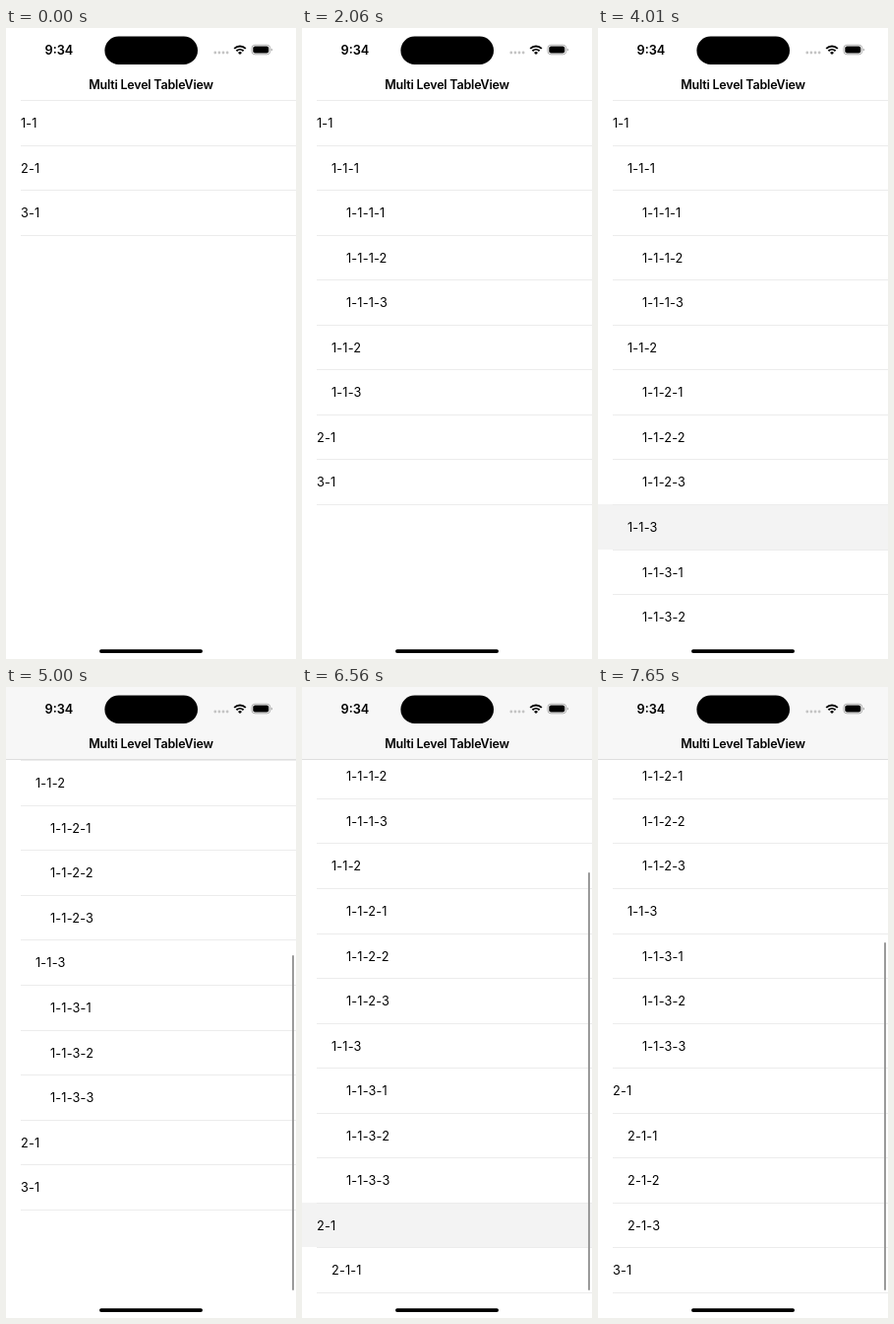
These frames come from a looping animation (295x640 px, 8000 ms). An HTML page:

```html
<!DOCTYPE html>
<html lang="en">
<head>
<meta charset="utf-8">
<title>Multi Level TableView</title>
<style>
  html, body { margin: 0; width: 100%; height: 100%; overflow: hidden; background: #fff; }
  body { position: relative; font: 12.75px Inter, "Liberation Sans", sans-serif; color: #000; }
  div, svg { position: absolute; box-sizing: border-box; }
  #table { left: 0; top: 0; width: 295px; height: 615px; overflow: hidden; }
  .row { left: 0; top: 0; width: 295px; height: 46px; line-height: 48px; letter-spacing: .15px; white-space: nowrap; }
  .row::before, .row::after { content: ""; position: absolute; left: 15px; right: 0; top: 0; height: 1px; background: #ececec; }
  .row::after { top: 46px; }
  #nav { left: 0; top: 0; width: 295px; height: 73px; }
  #nav.scrolled { height: 74px; background: #f7f7f7; border-bottom: 1px solid #dedede; }
  #title { left: 0; top: 48px; width: 295px; line-height: 20px; text-align: center; font-size: 12.5px; font-weight: 600; letter-spacing: -.2px; }
  #clock { left: 39.5px; top: 13px; line-height: 20px; font-weight: 600; }
  #thumb { left: 290.6px; width: 2.3px; border-radius: 2px; background: #9a9a9a; }
</style>
</head>
<body>
<div id="table"></div>
<div id="nav"><div id="title">Multi Level TableView</div><div id="clock">9:34</div></div>
<div id="thumb"></div>
<svg width="295" height="640" style="left:0;top:0">
  <rect x="100.4" y="8.5" width="94.6" height="28.4" rx="14.2"/>
  <path d="M212.8 25h13" stroke="#c4c4c4" stroke-width="2.8" stroke-linecap="round" stroke-dasharray="0 4.1"/>
  <g fill="none" stroke="#000" stroke-width="1.9">
    <path d="M232.2 20.9a8.3 8.3 0 0 1 11.6 0"/>
    <path d="M234.4 23.3a5.2 5.2 0 0 1 7.2 0"/>
  </g>
  <path d="M238 27l-2-2.1a2.9 2.9 0 0 1 4 0z"/>
  <rect x="249.9" y="17.2" width="18.8" height="9.6" rx="3.2" fill="none" stroke="#a6a6a6" stroke-width=".9"/>
  <rect x="251.3" y="18.6" width="16" height="6.8" rx="2"/>
  <path d="M269.7 20.4q1.3 .5 1.3 1.6t-1.3 1.6z" fill="#a6a6a6"/>
  <rect x="95" y="630.2" width="105" height="3.8" rx="1.9"/>
</svg>
<script>
const LOOP = 8000, STEP = 110, TOP = 73.5, ROW = 45.56, VIEW = 541;
const TRACK_TOP = 76.3, TRACK = 535.7;

// Time at which each parent row is tapped open
const taps = { '1-1': 500, '1-1-1': 1610, '1-1-2': 2820, '1-1-3': 3670, '2-1': 6220 };

// Each swipe pulls the list past its end, then lets it spring back
const swipes = [
  { at: 4780, drag: 330, release: 5260, settle: 520, rows: 15, pull: 90.8 },
  { at: 7090, drag: 300, release: 7540, settle: 110, rows: 18, pull: 3 },
];
const starts = [0, ...Object.values(taps), ...swipes.flatMap(s => [s.at, s.release])];

const $ = id => document.getElementById(id);
const clamp = x => Math.min(1, Math.max(0, x));
const ease = x => x * x * (3 - 2 * x);
const easeOut = x => 1 - (1 - x) ** 3;
const progress = (t, start, span) => easeOut(clamp((t - start + 30) / (span + 30)));
const endOf = swipe => swipe ? swipe.rows * ROW - VIEW : 0;

const rows = [];
function addRow(label, index = 0) {
  const el = document.createElement('div');
  el.className = 'row';
  el.textContent = label;
  el.style.paddingLeft = 15 * (label.length - 1) / 2 + 'px';
  $('table').append(el);
  rows.push({ el, label, index, parent: label.slice(0, -2) });
  if (taps[label]) for (let i = 0; i < 3; i++) addRow(`${label}-${i + 1}`, i);
}
['1-1', '2-1', '3-1'].forEach(label => addRow(label));

function openness(label, t) {
  const tap = taps[label];
  if (tap === undefined) return 1;
  return t < tap ? 0 : ease(clamp((t - tap + 20) / 300));
}

function highlight(label, t) {
  const age = t - taps[label];
  return age >= 0 ? 1 - clamp((age - 100) / 310) : 0;
}

function scrollAt(t, swipe, from) {
  if (!swipe) return 0;
  const end = endOf(swipe), peak = end + swipe.pull;
  return t < swipe.release
    ? from + (peak - from) * progress(t, swipe.at, swipe.drag)
    : peak + (end - peak) * progress(t, swipe.release, swipe.settle);
}

function drawThumb(t, swipe, scroll) {
  $('thumb').hidden = !swipe;
  if (!swipe) return;
  const content = swipe.rows * ROW;
  const over = Math.max(0, scroll - endOf(swipe));
  Object.assign($('thumb').style, {
    top: TRACK_TOP + (scroll - over) / content * TRACK + over + 'px',
    height: VIEW / content * TRACK - over + 'px',
    opacity: 1 - clamp((t - swipe.release - 1340) / 370),
  });
}

function draw(time) {
  // The screen refreshes in steps counted from the latest touch
  const start = Math.max(...starts.filter(s => s <= time));
  const t = start + Math.floor((time - start) / STEP) * STEP;
  const n = swipes.filter(s => s.at <= t).length;
  const swipe = swipes[n - 1];
  const scroll = scrollAt(t, swipe, endOf(swipes[n - 2]));

  let y = TOP - scroll;
  for (const { el, label, index, parent } of rows) {
    const p = openness(parent, t);
    // New rows fade in at their final place while later rows slide off them
    const top = Math.floor(y + index * ROW * (1 - p));
    const shade = 255 - 46 * highlight(label, t);
    el.style.transform = `translateY(${top}px)`;
    el.style.opacity = p;
    el.style.background = `rgb(${shade},${shade},${shade})`;
    y += ROW * p;
  }

  $('nav').className = swipe ? 'scrolled' : '';
  drawThumb(t, swipe, scroll);
}

const origin = performance.now();
function tick() {
  draw((performance.now() - origin) % LOOP);
  requestAnimationFrame(tick);
}
tick();
</script>
</body>
</html>
```
